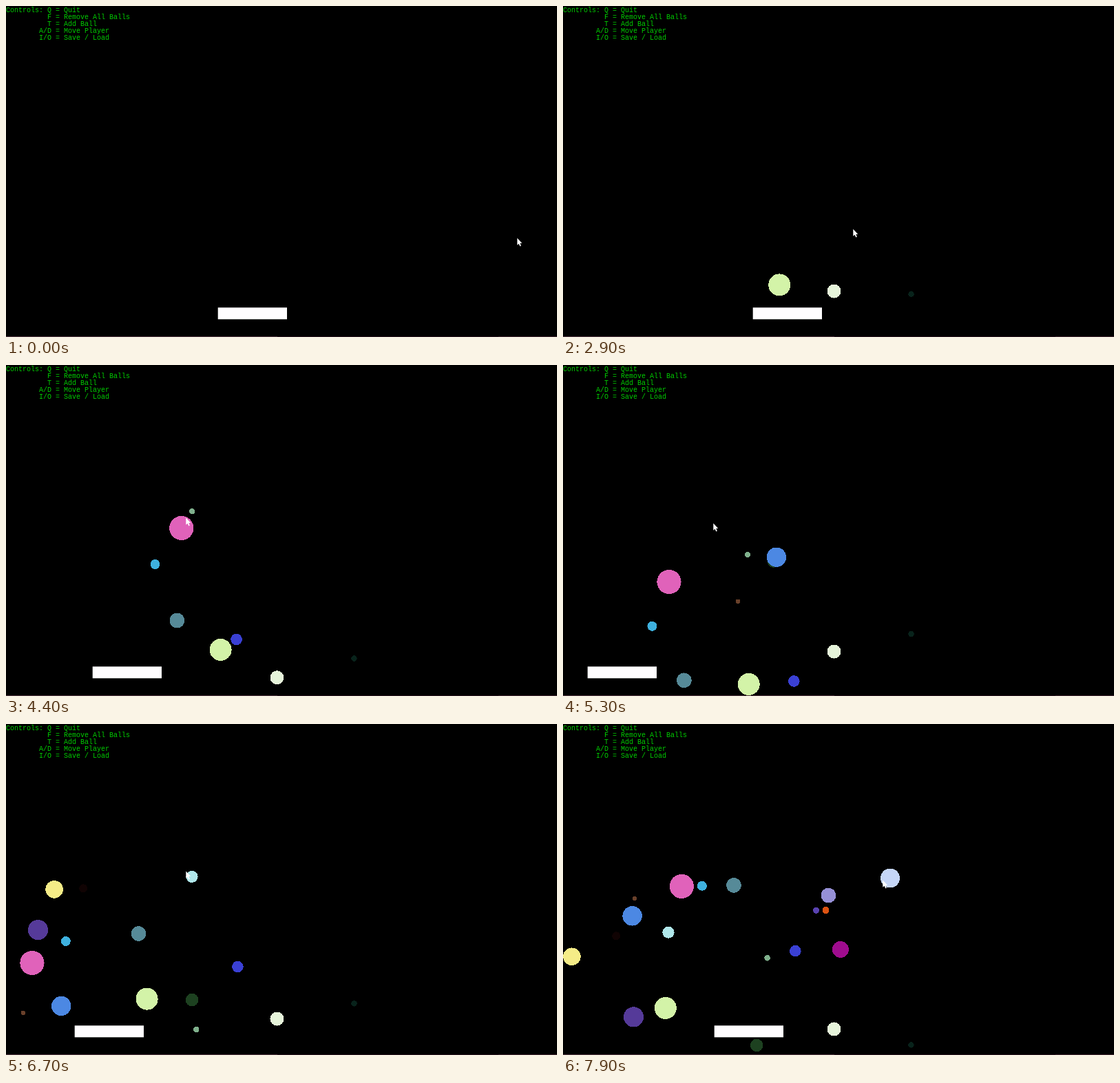
These frames come from a looping animation (800 by 480 pixels, 8000 ms). An HTML page:

```html
<!DOCTYPE html>
<html lang="en">
<head>
<meta charset="utf-8">
<title>Bouncing balls</title>
<style>
  html, body { margin: 0; width: 100%; height: 100%; overflow: hidden; background: #000; }
  svg { display: block; width: 800px; height: 480px; }
  text { font: 10px "Liberation Mono", "Courier New", monospace; fill: #00cd00; white-space: pre; }
  circle { shape-rendering: crispEdges; }
</style>
</head>
<body>
<svg viewBox="0 0 800 480">
  <rect width="800" height="480" fill="#000"/>
  <rect y="479" width="800" height="1" fill="#24101a"/>
  <rect y="479" width="394" height="1" fill="#4c323c"/>
  <rect x="715" y="479" width="85" height="1" fill="#3c222c"/>
  <g id="help"></g>
  <rect id="paddle" y="437.3" width="100.3" height="17" fill="#fffdff"/>
  <g id="balls"></g>
  <path id="cursor" d="M.3 .6V10.8L2.6 8.7 4.3 12.4 5.8 11.7 4.3 8.1H7.2Z" fill="#fff"/>
</svg>
<script>
const NS = 'http://www.w3.org/2000/svg';
const LOOP = 8, TICK = .1, SUB = 50, DT = TICK / SUB;
const GRAVITY = 43.8, FLOOR = 480;
const PADDLE = { top: 437, bottom: 454, width: 100 };
const $ = id => document.getElementById(id);

function add(parent, tag, attrs) {
  const el = document.createElementNS(NS, tag);
  for (const k in attrs) el.setAttribute(k, attrs[k]);
  return parent.appendChild(el);
}

['Controls: Q = Quit', 'F = Remove All Balls', 'T = Add Ball', 'A/D = Move Player', 'I/O = Save / Load']
  .forEach((s, i) => {
    const x = i && 72 - 6 * s.indexOf('=');
    add($('help'), 'text', { x, y: 9 + i * 10 }).textContent = s;
  });

// Rests, runs to the left wall, then back.
const paddleX = t => Math.max(0, Math.min(308, 100 * Math.abs(t - 5.685) - 2));

// Free fall with elastic bounces on wall, floor and paddle; a kick resets the velocity.
function simulate(r, [t0, x, y], [vx, vy], kicks) {
  const track = [], queue = [...kicks];
  for (let n = Math.round(t0 / DT); n * DT < LOOP; n++) {
    const t = n * DT;
    if (n % SUB === 0) track[n / SUB] = [x, y];
    if (queue.length && t >= queue[0][0]) {
      const kick = queue.shift();
      vx = kick[1];
      vy = kick[2] ?? vy;
    }
    const oldY = y, left = paddleX(t);
    x += vx * DT;
    y += vy * DT + GRAVITY / 2 * DT * DT;
    vy += GRAVITY * DT;
    const inReach = x > left - r && x < left + PADDLE.width + r;
    const onTop = vy > 0 && oldY + r <= PADDLE.top && y + r > PADDLE.top;
    const below = vy < 0 && oldY - r >= PADDLE.bottom && y - r < PADDLE.bottom;
    if (x < r && vx < 0) vx = -vx;
    if ((y + r > FLOOR && vy > 0) || (inReach && (onTop || below))) vy = -vy;
  }
  return track;
}

const balls = [];
// start: time and place; speed: px per second; kicks: [time, vx, vy] from other balls
function ball(fill, r, start, speed, ...kicks) {
  const [t, x, y] = start;
  balls.push({
    corner: [t, x - r, y - r],
    track: simulate(r, start, speed, kicks),
    el: add($('balls'), 'circle', { r, fill })
  });
}

ball('#e6f4da', 10, [.73, 393.5, 410], [0, 0]);
ball('#d3f3a8', 16, [1.38, 317, 396], [-1.8, 0], [4.4, -46.5]);
ball('#08231b', 4.2, [1.69, 505.5, 385.6], [0, 0]);
ball('#3a40d4', 8.3, [3.1, 333.5, 333.6], [.8, 21]);
ball('#568a98', 10.8, [3.4, 329, 288.4], [-80.6, 60.2], [6.1, 135, -111], [7.2, -17]);
ball('#3eb1df', 7, [3.6, 294, 239], [-96.8, 45], [6.1, 58], [7.2, 123]);
ball('#7fb08c', 4.3, [3.7, 272, 188], [-2.5, 19.3], [6.1, 17]);
ball('#e062ba', 17.6, [4.3, 266, 230], [-112, 62.6]);
ball('#1d4120', 9.3, [4.8, 318.6, 264], [-25.5, 30], [7.2, 34]);
ball('#69402a', 3.2, [4.9, 338, 289], [-210, 125.4], [6.1, -102]);
ball('#4c88e3', 14.2, [5.1, 345.5, 263], [-178, 74], [6.6, 17]);
ball('#553a99', 14.6, [5.4, 176.5, 233], [-100, 22]);
ball('#f5ec87', 12.8, [5.6, 179, 206], [-99, 6.7], [7.2, -11]);
ball('#100303', 6, [6.4, 150, 231], [-126, 18], [7.2, 40]);
ball('#b0e7ea', 8.6, [6.7, 270, 221.4], [-97.5, 41]);
ball('#9f0c8e', 12, [6.8, 236.4, 244.7], [151.4, 50.7]);
ball('#5942b0', 4.6, [7.1, 375.5, 241], [-10, 19]);
ball('#dc5312', 5, [7.4, 379, 256], [5, 17]);
ball('#9690d6', 10.8, [7.6, 385, 243], [1.5, 12]);
ball('#c5d6f7', 14, [7.8, 470, 222], [50, 13]);

// The pointer visits each ball's starting corner, with a few stops between.
const pointer = [
  [.3, 742, 336], [1.5, 497, 391], [2.9, 421, 323], [4, 258, 132],
  [6.1, 225, 194], [7.2, 365, 257], [7.9, 464, 226],
  ...balls.map(b => b.corner)
].sort((p, q) => p[0] - q[0]);

function pointerAt(t) {
  const i = pointer.findIndex(p => p[0] >= t);
  if (i < 1) return pointer[0].slice(1);
  const [a, x0, y0] = pointer[i - 1], [b, x1, y1] = pointer[i];
  const k = (t - a) / (b - a);
  return [x0 + (x1 - x0) * k, y0 + (y1 - y0) * k];
}

function draw(seconds) {
  const tick = Math.floor(seconds % LOOP * 10), t = tick / 10;
  for (const { track, el } of balls) {
    const pos = track[tick];
    el.style.display = pos ? '' : 'none';
    if (!pos) continue;
    el.setAttribute('cx', pos[0]);
    el.setAttribute('cy', pos[1]);
  }
  $('paddle').setAttribute('x', Math.round(paddleX(t)) - .3);
  $('cursor').setAttribute('transform', `translate(${pointerAt(t).map(Math.round)})`);
}

const start = performance.now();
function loop() {
  draw((performance.now() - start) / 1000);
  requestAnimationFrame(loop);
}
loop();
</script>
</body>
</html>
```
